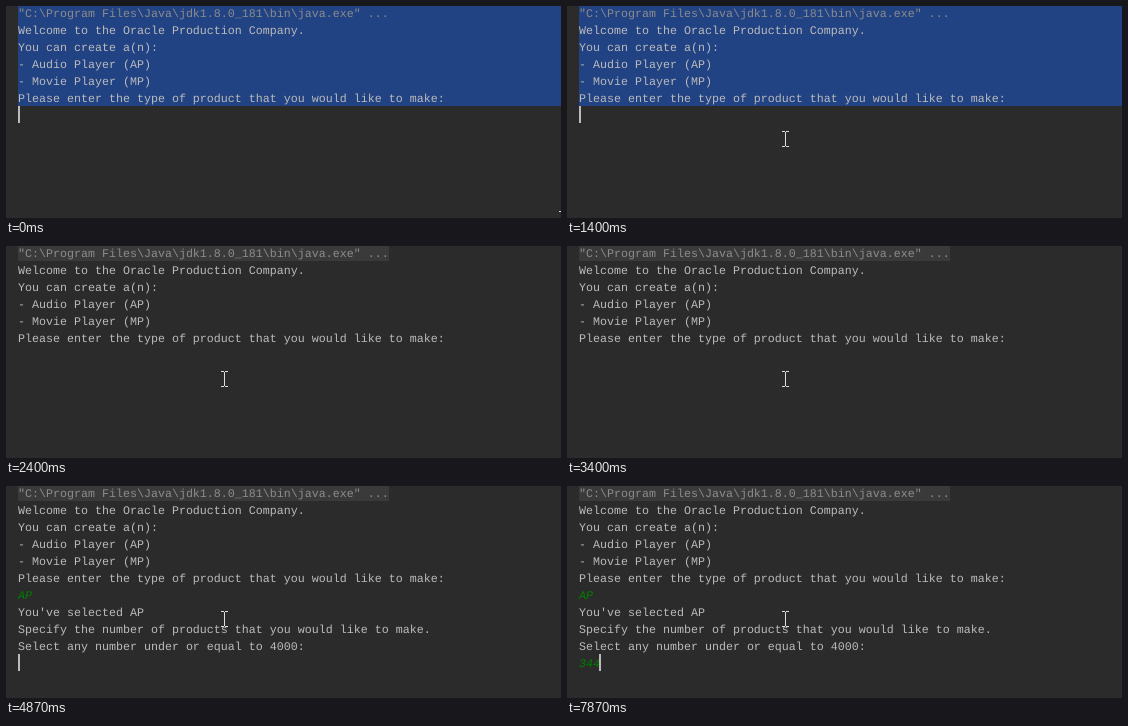
Animation, 555 px wide and 212 px high, one loop 8 s. Source, as an HTML page:

```html
<!DOCTYPE html>
<html lang="en">
<head>
<meta charset="utf-8">
<title>Console</title>
<style>
  html, body { margin: 0; width: 100%; height: 100%; overflow: hidden; background: #2b2b2b; }
  svg { display: block; }
  text {
    font: 11.665px "Liberation Mono", "Courier New", monospace;
    fill: #bbb;
    white-space: pre;
    text-rendering: geometricPrecision;
  }
  rect, path { shape-rendering: crispEdges; }
  .command { fill: #8c8c8c; }
  .input { fill: #007f00; font-style: italic; }
</style>
</head>
<body>
<svg width="555" height="212" viewBox="0 0 555 212">
  <rect width="555" height="212" fill="#2b2b2b"/>
  <rect x="12" width="371" height="15" fill="#3a3a3a"/>
  <rect id="selection" x="12" width="543" height="100" fill="#214283"/>
  <g id="lines"></g>
  <rect id="caret" width="2" height="17" fill="#bbb"/>
  <path id="pointer" fill="#ddd" d="M-3-8h3v1h1v-1h3v1h-3v1h-1v12h1v1h3v1h-3v-1h-1v1h-3v-1h3v-1h0v-12h0v-1h-3z M0-7h1v14h-1z"/>
</svg>
<script>
const LOOP = 8000, LEFT = 12, CHAR = 7, ROW = 17;
const $ = id => document.getElementById(id);
const rowTop = row => row * ROW - 2;

function addLine(row, text, kind = "") {
  const el = document.createElementNS("http://www.w3.org/2000/svg", "text");
  el.setAttribute("x", LEFT);
  el.setAttribute("y", rowTop(row) + 13);
  el.setAttribute("class", kind);
  el.textContent = text;
  $("lines").append(el);
  return el;
}

addLine(0, '"C:\\Program Files\\Java\\jdk1.8.0_181\\bin\\java.exe" ...', "command");
[
  "Welcome to the Oracle Production Company.",
  "You can create a(n):",
  "- Audio Player (AP)",
  "- Movie Player (MP)",
  "Please enter the type of product that you would like to make:"
].forEach((text, i) => addLine(i + 1, text));

const typeInput = addLine(6, "", "input");
const reply = [
  "You've selected AP",
  "Specify the number of products that you would like to make.",
  "Select any number under or equal to 4000:"
].map((text, i) => addLine(i + 7, text));
const countInput = addLine(10, "", "input");

// [time, caret visible, product type, count]
const steps = [
  [0, 1, "", ""], [930, 0, "", ""], [1400, 1, "", ""], [2400, 0, "", ""],
  [2930, 1, "", ""], [3400, 0, "", ""], [3870, 1, "A", ""], [4070, 1, "AP", ""],
  [4870, 1, "AP", ""], [5470, 0, "AP", ""], [6000, 1, "AP", ""], [6470, 0, "AP", ""],
  [7000, 1, "AP", "3"], [7270, 1, "AP", "34"], [7870, 1, "AP", "344"]
];
const DESELECT = 1670, ENTER = 4870;
const moves = [400, 470, 530, 600, 670, 730, 800, 870, 930];

const show = (el, on) => el.setAttribute("visibility", on ? "visible" : "hidden");

function draw(t) {
  const [, caretOn, type, count] = steps.findLast(step => step[0] <= t);
  const entered = t >= ENTER;
  const length = (entered ? count : type).length;

  show($("selection"), t < DESELECT);
  reply.forEach(line => show(line, entered));
  typeInput.textContent = type;
  countInput.textContent = count;

  show($("caret"), caretOn);
  $("caret").setAttribute("x", length ? LEFT - 1 + CHAR * length : LEFT);
  $("caret").setAttribute("y", rowTop(entered ? 10 : 6));

  const left = 1 - moves.filter(m => m <= t).length / moves.length;
  const far = left * left;
  const x = Math.round(218 + 338 * far), y = Math.round(133 + 80 * far);
  $("pointer").setAttribute("transform", `translate(${x} ${y})`);
}

const start = performance.now();
function tick() {
  draw((performance.now() - start) % LOOP);
  requestAnimationFrame(tick);
}
draw(0);
requestAnimationFrame(tick);
</script>
</body>
</html>
```
